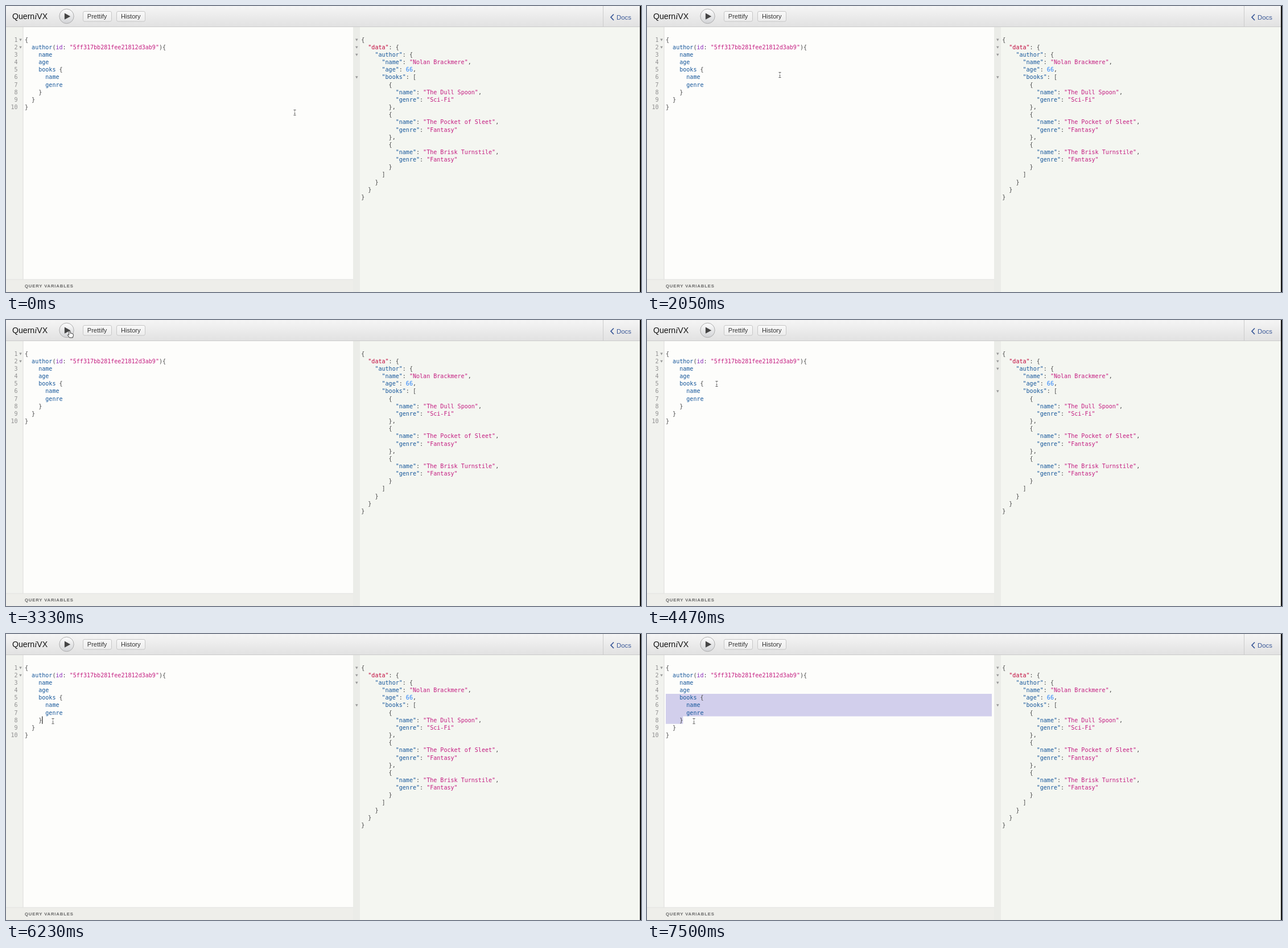
These frames come from a looping animation (1116 by 502 pixels, 8 s). An HTML page:

```html
<!DOCTYPE html>
<html lang="en">
<head>
<meta charset="utf-8">
<style>
html, body { margin: 0; width: 100%; height: 100%; overflow: hidden; }
svg { display: block; }
text { white-space: pre; font-family: "Liberation Sans", Arial, sans-serif; }
.code text { font: 10.05px "DejaVu Sans Mono", monospace; fill: #484848; }
.code .field { fill: #16579b; }
.code .attr { fill: #8b2bb9; }
.code .str { fill: #c41c80; }
.code .num { fill: #2882f9; }
.code .def { fill: #c0053a; }
.code .line { fill: #909090; text-anchor: end; }
.fold { fill: #999; }
.label { font-size: 11.1px; fill: #333; text-anchor: middle; }
.button { fill: url(#btn); stroke: #c6c6c6; }
</style>
</head>
<body>
<svg width="1116" height="502" viewBox="0 0 1116 502">
  <defs>
    <linearGradient id="bar" x2="0" y2="1"><stop stop-color="#f5f5f5"/><stop offset="1" stop-color="#e1e1e1"/></linearGradient>
    <linearGradient id="btn" x2="0" y2="1"><stop stop-color="#f9f9f9"/><stop offset="1" stop-color="#ececec"/></linearGradient>
    <linearGradient id="run" x2="0" y2="1"><stop stop-color="#fdfdfd"/><stop offset="1" stop-color="#d2d3d6"/></linearGradient>
  </defs>

  <rect width="1116" height="502" fill="#fdfdfb"/>
  <rect y="37" width="30" height="443" fill="#f1f2ee"/>
  <path d="M30 37V480" stroke="#dcdcda"/>
  <rect x="610" y="37" width="12" height="465" fill="#ebece8"/>
  <rect x="622" y="37" width="494" height="465" fill="#f4f6f1"/>
  <rect y="480" width="610" height="22" fill="#eeeeea"/>
  <path d="M0 480H610" stroke="#e2e2e0"/>
  <text x="33" y="494.2" font-size="7.7" font-weight="bold" letter-spacing=".85" fill="#666">QUERY VARIABLES</text>

  <rect width="1116" height="37" fill="url(#bar)"/>
  <path d="M0 36.5H1116M1049.5 0V37" stroke="#cbcbcb"/>
  <text x="11" y="23" font-size="14.1" fill="#111">Quern<tspan font-family="Liberation Serif, serif" font-style="italic" font-size="15">i</tspan>VX</text>
  <circle cx="106.5" cy="18" r="12.7" fill="url(#run)" stroke="#adadad"/>
  <path id="runIcon" fill="#444"/>
  <rect class="button" x="135.5" y="9.5" width="50" height="17.5" rx="2.5"/>
  <text class="label" x="160" y="22">Prettify</text>
  <rect class="button" x="194.5" y="9.5" width="50" height="17.5" rx="2.5"/>
  <text class="label" x="219.3" y="22">History</text>
  <path d="M1068 14.5L1063 19.7L1068 25" fill="none" stroke="#3b5998" stroke-width="1.7"/>
  <text x="1073" y="23.5" font-size="11.4" fill="#3b5998">Docs</text>
  <rect x="1114" width="2" height="502" fill="#111"/>

  <path id="selection" fill="#d2cfec"/>
  <g class="code" id="query"></g>
  <g class="code" id="result"></g>
  <path id="queryFolds" class="fold"/>
  <path id="resultFolds" class="fold"/>
  <path id="caret" stroke="#111" stroke-width="1.1"/>
  <g id="spinner" fill="none" stroke="#969696" stroke-width="5">
    <circle r="7.5" stroke-opacity=".15"/>
    <path d="M-5.3 -5.3A7.5 7.5 0 0 1 5.3 -5.3" stroke-opacity=".8"/>
  </g>

  <g id="pointer">
    <g id="beam" fill="none" stroke="#555">
      <path d="M.5 -4V4" stroke-opacity=".5"/>
      <path d="M-1.5 -4.5H2.5M-1.5 4.5H2.5M-.5 1.5H1.5"/>
    </g>
    <path id="arrow" d="M0 0V9.6L2.2 7.6L3.7 11L5.3 10.3L3.8 7H6.7Z" fill="#111" stroke="#fff" stroke-width=".7"/>
    <path id="hand" d="M-1.3 .8Q0 -.8 1.1 .8V4.3Q2.3 3.5 3 4.7Q4.2 4 4.8 5.2Q6.3 5 6.3 6.6V8.5L5.2 12H-.5L-3.8 7.3Q-3.6 5.7 -1.3 7.3Z" fill="#fff" stroke="#222" stroke-width=".9"/>
  </g>
</svg>
<script>
const LOOP = 8000, CHAR = 6.05, ROW = 13.15, LEFT = 33;
const $ = id => document.getElementById(id);
const rowTop = row => 52.5 + (row - 1) * ROW;

const query = `{
  author(id: "5ff317bb281fee21812d3ab9"){
    name
    age
    books {
      name
      genre
    }
  }
}`;

const data = {
  data: {
    author: {
      name: "Nolan Brackmere",
      age: 66,
      books: [
        { name: "The Dull Spoon", genre: "Sci-Fi" },
        { name: "The Pocket of Sleet", genre: "Fantasy" },
        { name: "The Brisk Turnstile", genre: "Fantasy" }
      ]
    }
  }
};

function tokenClass(token, next) {
  if (token === '"data"') return "def";
  if (token[0] === '"') return next === ":" ? "field" : "str";
  if (token === "id") return "attr";
  return /^\d/.test(token) ? "num" : "field";
}

function drawCode(id, source, x, numbered) {
  $(id).innerHTML = source.split("\n").map((line, i) => {
    const y = rowTop(i + 1) + 10.2;
    const body = line.replace(/"[^"]*"|\w+/g, (token, at) =>
      `<tspan class="${tokenClass(token, line[at + token.length])}">${token}</tspan>`);
    const number = numbered ? `<text class="line" x="20.5" y="${y}">${i + 1}</text>` : "";
    return number + `<text x="${x}" y="${y}">${body}</text>`;
  }).join("");
}

const folds = (x, rows) =>
  rows.map(row => `M${x - 2.3} ${rowTop(row) + 5}h4.6l-2.3 4.2z`).join("");

drawCode("query", query, LEFT, true);
drawCode("result", JSON.stringify(data, null, 2), 624.2, false);
$("queryFolds").setAttribute("d", folds(25.5, [1, 2]));
$("resultFolds").setAttribute("d", folds(616.3, [1, 2, 3, 6]));

// Pointer stops: time, x, y
const stops = [
  [0, 507, 187], [170, 507, 187], [460, 325, 189], [960, 325, 189],
  [1020, 313, 189], [1250, 303, 188], [1690, 303, 188], [2490, 140, 30],
  [2570, 140, 30], [2710, 128, 23], [2950, 112, 19], [3520, 112, 19],
  [4320, 122, 112], [4400, 122, 112], [5180, 102, 130], [5250, 102, 130],
  [5620, 97, 133], [5980, 82, 153], [LOOP, 82, 153]
];

function pointerAt(t) {
  const i = stops.findIndex(stop => stop[0] > t);
  const [t0, x0, y0] = stops[i - 1], [t1, x1, y1] = stops[i];
  const k = (t - t0) / (t1 - t0), e = k * k * (3 - 2 * k);
  return [x0 + (x1 - x0) * e, y0 + (y1 - y0) * e].map(Math.round);
}

// Selection head, moving back from the end of row 8: time, row, column
const heads = [
  [6170, 8, 5], [6600, 8, 4], [6650, 7, 6], [6700, 6, 6],
  [6780, 5, 10], [6870, 5, 4], [6960, 5, 0]
];

function selectionPath(row, col) {
  const x = LEFT + col * CHAR, end = LEFT + 5 * CHAR, y = rowTop(row), last = rowTop(8);
  if (row === 8) return `M${x} ${y}H${end}V${y + ROW}H${x}Z`;
  return `M${x} ${y}H606V${last}H${end}V${last + ROW}H${LEFT}V${y + ROW}H${x}Z`;
}

const show = (id, visible) => $(id).style.display = visible ? "" : "none";

function render(t) {
  const [x, y] = pointerAt(t);
  const overRun = Math.hypot(x - 106.5, y - 18) < 13;
  $("pointer").setAttribute("transform", `translate(${x} ${y})`);
  show("hand", overRun);
  show("arrow", !overRun && y < 37);
  show("beam", y >= 37);

  const loading = t >= 3250 && t < 3330;
  show("result", !loading);
  show("resultFolds", t < 3250 || t >= 3730);
  show("spinner", loading);
  $("spinner").setAttribute("transform", `translate(869 270) rotate(${(t - 3250) * 0.6})`);
  $("runIcon").setAttribute("d", loading ? "M101 12.5h11v11h-11z" : "M102.9 12.6L113.2 18.2L102.9 23.8Z");

  const head = heads.findLast(h => h[0] <= t);
  show("selection", head);
  show("caret", head && t < 7500);
  if (head) {
    const [, row, col] = head;
    $("selection").setAttribute("d", selectionPath(row, col));
    $("caret").setAttribute("d", `M${LEFT + col * CHAR + 0.6} ${rowTop(row)}v${ROW}`);
  }
}

function tick() {
  render(performance.now() % LOOP);
  requestAnimationFrame(tick);
}
tick();
</script>
</body>
</html>
```
